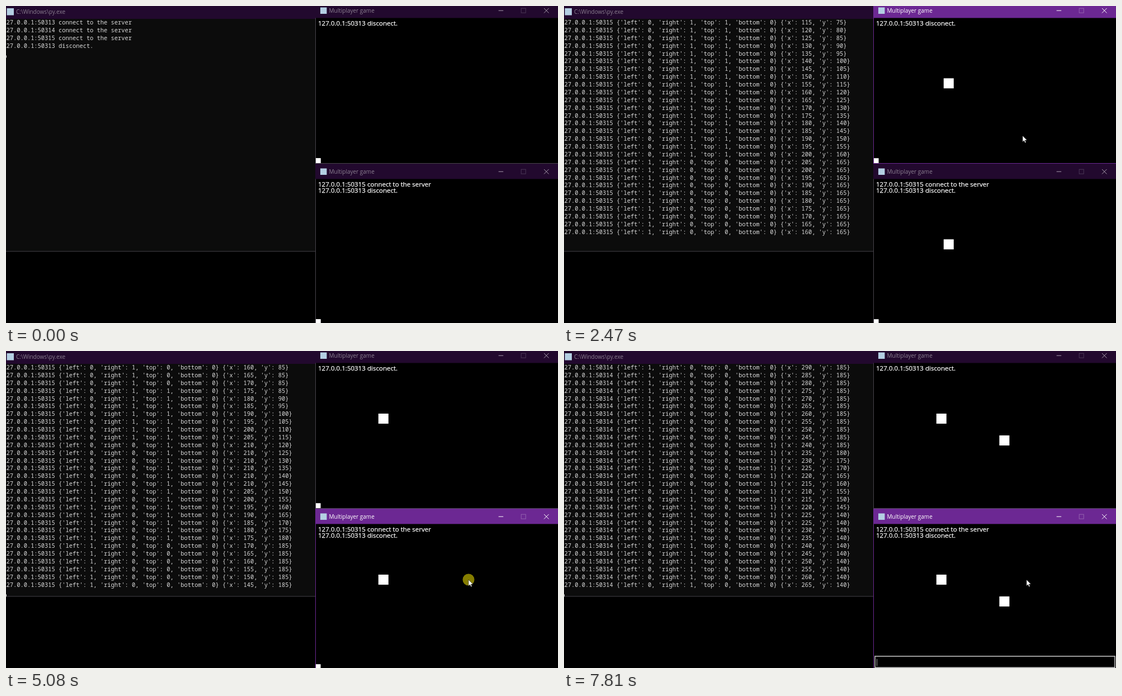
Recreate the animation shown at these times as an HTML page. Size 987x567 px, loop 8 s.

```html
<!DOCTYPE html>
<html lang="en">
<head>
<meta charset="utf-8">
<title>Multiplayer game</title>
<style>
  html, body { margin: 0; width: 100%; height: 100%; overflow: hidden; background: #000; }
  #stage { position: relative; width: 987px; height: 567px; overflow: hidden; background: #000; }
  #stage > svg { position: absolute; inset: 0; }
  #log {
    position: absolute; left: 0.5px; top: 23px; margin: 0; height: 415px; overflow: hidden;
    font: 10.4px/13.87px "Noto Sans Mono", monospace; color: #dadada;
  }
  .title { font: 10px "Open Sans", sans-serif; fill: #8b7f90; }
  .chat { font: 11.55px "Open Sans", sans-serif; fill: #fff; stroke: #fff; stroke-width: .25; }
  .bar { fill: #22092e; }
  .edge { fill: #48444b; }
  .btn { stroke: #a89bad; fill: none; }
  .max { stroke: #4b3756; fill: none; }
  .on .bar, .on .edge { fill: #6c2893; }
  .on .title { fill: #fff; }
  .on .btn { stroke: #fff; }
  .on .max { stroke: #9362ae; }
</style>
</head>
<body>
<div id="stage">
  <svg id="scene" width="987" height="567"></svg>
  <pre id="log"></pre>
  <svg width="987" height="567">
    <rect id="caret" width="1" height="4" fill="#ddd"/>
    <g id="mouse">
      <circle id="click" r="10.5" fill="#857d00"/>
      <path d="M0 0V11.2L2.6 8.8L4.4 12.8L6.2 12L4.4 8.1H7.9Z" fill="#fff" stroke="#000" stroke-width=".5"/>
    </g>
  </svg>
</div>
<script>
const LOOP = 8000, ROWS = 29, ROW_H = 13.87, STEP = 5, SCALE = 0.866, BOX = 18;
const $ = id => document.getElementById(id);

// Screen refreshes: [first, last, count]
const REFRESH = [
  [0, 0, 1], [290, 890, 9], [1380, 1380, 1], [1620, 2380, 11], [2470, 3270, 11], [3340, 3500, 3],
  [3980, 4060, 2], [4310, 4770, 7], [5080, 5080, 1], [5230, 6000, 11], [6090, 6880, 11],
  [6950, 7260, 5], [7810, 7810, 1]
];
const ticks = REFRESH.flatMap(([a, b, n]) =>
  Array.from({ length: n }, (_, i) => Math.round((a + (b - a) * i / Math.max(1, n - 1)) / 10) * 10));

// Keys held: [keys, messages, blocked]
const players = [
  {
    port: 50315,
    runs: [['R', 8], ['RT', 33], ['L', 16], ['LB', 8], ['B', 1], ['RB', 7], ['R', 11], ['RT', 7],
      ['T', 5], ['LT', 8], ['L', 6]],
    pace: [[1575, 0], [1770, 11.1], [2470, 51.8], [3270, 98.1], [3490, 110.9]]
  },
  {
    port: 50314,
    runs: [['R', 22], ['RT', 16], ['R', 23], ['R', 1, true], ['R', 2], ['RT', 6], ['T', 6], ['LT', 9],
      ['L', 12], ['LB', 6], ['RB', 3], ['RB', 1, true], ['R', 9]],
    pace: [[5210, 0], [6560, 77.4], [7250, 116.9]]
  }
];

const MOUSE = [
  [290, 762, 527], [440, 840, 460], [590, 867, 370], [740, 850, 290], [890, 820, 232],
  [3910, 820, 232], [4060, 823, 246], [4310, 818, 262], [4460, 799, 310], [4620, 808, 370], [4770, 827, 409]
];

const greeting = ['27.0.0.1:50313 connect to the server', '27.0.0.1:50314 connect to the server',
  '27.0.0.1:50315 connect to the server', '27.0.0.1:50313 disconect.'];

function simulate(player) {
  let x = 0, y = 0;
  player.lines = [];
  player.path = [[0, 0]];
  for (const [keys, count, blocked] of player.runs) {
    const [l, r, t, b] = [...'LRTB'].map(k => +keys.includes(k));
    for (let i = 0; i < count; i++) {
      player.lines.push(`27.0.0.1:${player.port} {'left': ${l}, 'right': ${r}, 'top': ${t}, 'bottom': ${b}} {'x': ${x}, 'y': ${y}}`);
      if (!blocked) { x += (r - l) * STEP; y += (t - b) * STEP; }
      player.path.push([x, y]);
    }
  }
}
players.forEach(simulate);

function sample(keys, t, col) {
  if (t <= keys[0][0]) return keys[0][col];
  const i = keys.findIndex(k => k[0] >= t);
  if (i < 0) return keys[keys.length - 1][col];
  const a = keys[i - 1], b = keys[i];
  return a[col] + (b[col] - a[col]) * (t - a[0]) / (b[0] - a[0]);
}

function gameWindow(id, top, messages) {
  return `<svg id="${id}" x="553" y="${top}" width="434" height="288" viewBox="553 -6 434 288">
    <rect x="553" y="-6" width="434" height="288"/>
    <rect class="box" width="${BOX}" height="${BOX}" fill="#fff"/>
    <rect class="box" width="${BOX}" height="${BOX}" fill="#fff"/>
    <rect class="edge" x="553" y="-6" width="1" height="288"/>
    <rect class="edge" x="553" y="281" width="434" height="1"/>
    <rect class="bar" x="553" y="-6" width="434" height="27.4"/>
    <rect x="562" y="2.5" width="11.5" height="11.5" fill="#b4cfe3"/>
    <text class="title" x="577.5" y="11.7">Multiplayer game</text>
    <path class="btn" d="M880.7 8.2h8.5M962 4l8.5 8.5m0-8.5l-8.5 8.5"/>
    <rect class="max" x="921.2" y="4.2" width="8" height="8"/>
    ${messages.map((m, i) => `<text class="chat" x="558" y="${35 + i * 11.3}">${m}</text>`).join('')}
  </svg>`;
}

$('scene').innerHTML = `
  <rect width="553" height="438.5" fill="#0c0c0c"/>
  <rect class="bar" width="553" height="23"/>
  <rect x="1.5" y="4" width="12.5" height="12.5" fill="#b4cfe3"/>
  <text class="title" x="18" y="14">C:\\Windows\\py.exe</text>
  <rect class="edge" y="438.4" width="553" height="1"/>
  ${gameWindow('upper', -6, ['127.0.0.1:50313 disconect.'])}
  ${gameWindow('lower', 282, ['127.0.0.1:50315 connect to the server', '127.0.0.1:50313 disconect.'])}
  <g id="input">
    <rect x="556" y="546" width="429" height="20.2" fill="#000" stroke="#ccc" stroke-width="1.5"/>
    <rect x="559" y="551" width="1" height="12.5" fill="#aaa"/>
  </g>`;

const show = (el, on) => el.setAttribute('visibility', on ? 'visible' : 'hidden');

function drawLog(progress) {
  const lines = greeting.concat(...players.map((p, i) => p.lines.slice(0, Math.floor(progress[i]))));
  // Caught between the line feed and the next message
  const pending = progress.some(v => v % 1 > 0.7 && v % 1 < 0.85) && lines.length >= ROWS;
  const visible = lines.slice(pending ? 1 - ROWS : -ROWS);
  $('log').textContent = visible.join('\n');
  $('caret').setAttribute('y', 23 + visible.length * ROW_H + 10);
  show($('caret'), !pending);
}

function drawBoxes(id, progress, lag) {
  document.querySelectorAll(`#${id} .box`).forEach((box, i) => {
    const [x, y] = players[i].path[Math.max(0, Math.floor(progress[i] - lag))];
    box.setAttribute('x', 553.6 + x * SCALE - BOX / 2);
    box.setAttribute('y', 281.2 - y * SCALE - BOX / 2);
  });
}

function draw(t) {
  const progress = players.map(p => sample(p.pace, t, 1));
  drawLog(progress);
  drawBoxes('upper', progress, 0.6);
  drawBoxes('lower', progress, 0.3);
  $('upper').classList.toggle('on', t >= 1380 && t < 5080);
  $('lower').classList.toggle('on', t >= 5080);
  $('mouse').setAttribute('transform', `translate(${sample(MOUSE, t, 1)} ${sample(MOUSE, t, 2)})`);
  $('mouse').style.display = t >= 290 ? '' : 'none';
  show($('click'), t === 1380 || t === 5080);
  show($('input'), t >= 7810);
}

const start = performance.now();
let shown = -1;
function frame() {
  const t = (performance.now() - start) % LOOP;
  const tick = ticks.findLast(k => k <= t) ?? 0;
  if (tick !== shown) draw(shown = tick);
  requestAnimationFrame(frame);
}
frame();
</script>
</body>
</html>
```
